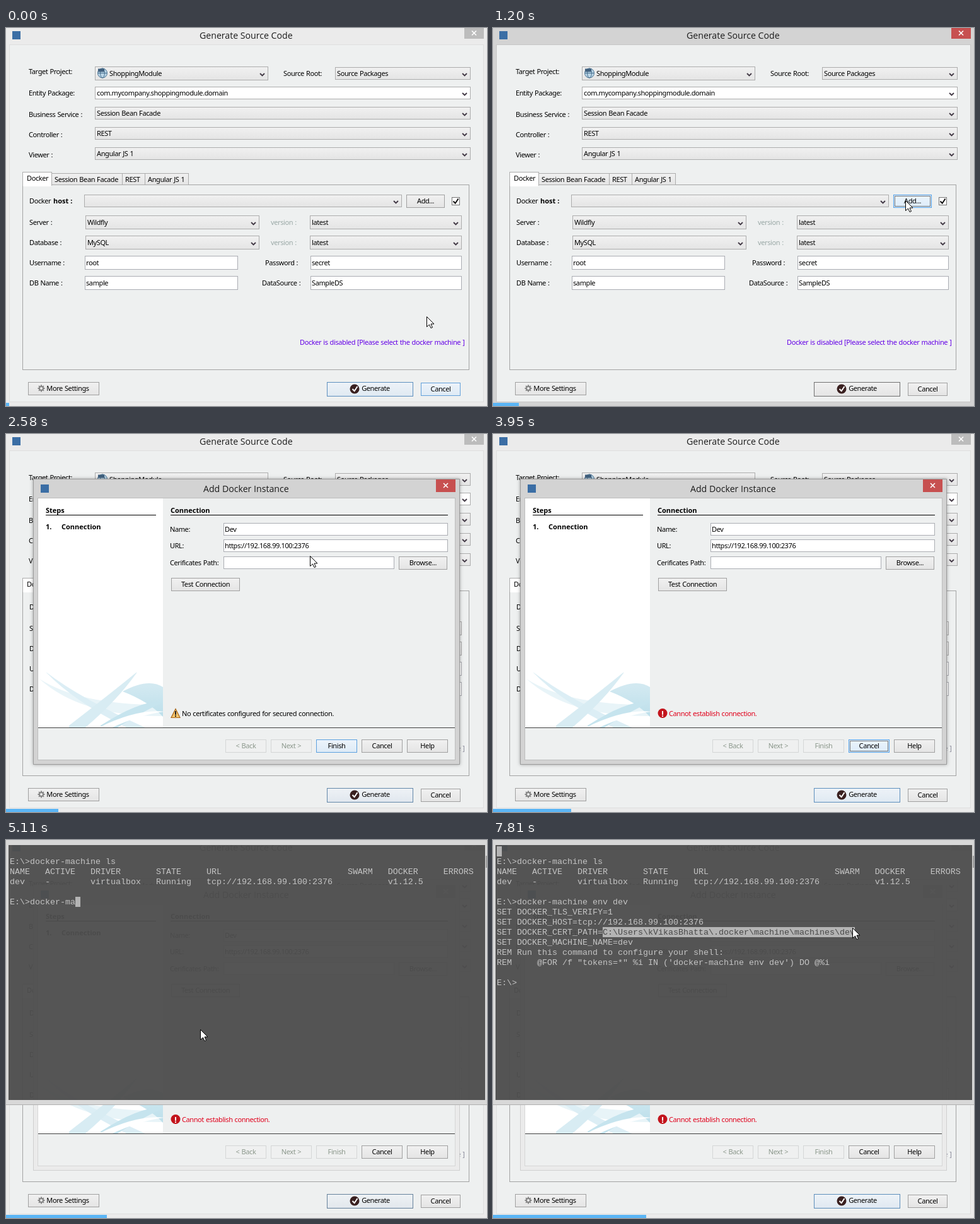
Write an HTML page with a canvas that moves like this. It is 763 px wide and 599 px high and loops after 8 s.

```html
<!DOCTYPE html>
<html lang="en">
<head>
<meta charset="utf-8">
<title>Generate Source Code</title>
<style>
html, body { margin: 0; width: 100%; height: 100%; overflow: hidden; background: #ebebeb; }
canvas { display: block; }
</style>
</head>
<body>
<canvas id="stage" width="763" height="599"></canvas>
<script>
const c = document.getElementById('stage').getContext('2d', { alpha: false });
const LOOP = 8000, STEPS = 47, STEP = LOOP / STEPS;
const UI = '11px "Noto Sans", sans-serif';
const BOLD = 'bold 11px "Noto Sans", sans-serif';
const TITLE = '14.15px "Open Sans", sans-serif';
const MONO = '13.333px "Liberation Mono", monospace';
const FACE = '#eef0f0', ACTIVE = '#d3d3d3', INACTIVE = '#ebebeb', EDGE = '#acacac', LOGO = '#3b6ea5';

// Scene events in ms
const FOCUS = 150, PRESS = 1000, MODAL = 1500, FAIL = 3050, CONSOLE = 4050;
const LISTED = 4400, TYPE = 4640, TYPED = 5787, ENTER = 5940, SELECT = 6700;

const clamp = (v, lo, hi) => Math.max(lo, Math.min(hi, v));
const ease = k => k * k * (3 - 2 * k);

// Mouse moves: begin, end, x, y
const MOVES = [[FOCUS, PRESS, 654, 273], [1700, 2240, 672, 144], [2240, 2540, 482, 193],
  [2560, 2950, 310, 234], [3950, 4000, 308, 300], [6320, SELECT, 174, 139], [SELECT, 7650, 570, 139]];

function mouseAt(t) {
  return MOVES.reduce(([px, py], [begin, end, x, y]) => {
    const k = ease(clamp((t - begin) / (end - begin), 0, 1));
    return [px + (x - px) * k, py + (y - py) * k];
  }, [667, 457]).map(Math.round);
}

function fill(x0, y0, x1, y1, color) {
  c.fillStyle = color;
  c.fillRect(x0, y0, x1 - x0, y1 - y0);
}

function box(x0, y0, x1, y1, color, edge) {
  if (color) fill(x0, y0, x1, y1, color);
  c.strokeStyle = edge;
  c.lineWidth = 1;
  c.strokeRect(x0 + .5, y0 + .5, x1 - x0 - 1, y1 - y0 - 1);
}

function poly(points, color, edge, width = 1) {
  c.beginPath();
  points.forEach(([x, y]) => c.lineTo(x, y));
  if (color) { c.closePath(); c.fillStyle = color; c.fill(); }
  if (edge) { c.strokeStyle = edge; c.lineWidth = width; c.stroke(); }
}

const line = (x0, y0, x1, y1, color, width) => poly([[x0, y0], [x1, y1]], null, color, width);

function oval(x, y, rx, ry, color, edge) {
  c.beginPath();
  c.ellipse(x, y, rx, ry, 0, 0, 7);
  if (color) { c.fillStyle = color; c.fill(); }
  if (edge) { c.strokeStyle = edge; c.lineWidth = 1; c.stroke(); }
}

const disc = (x, y, r, color) => oval(x, y, r, r, color);

function tick(x, y, r, color) {
  poly([[x - r, y], [x - r * .2, y + r * .8], [x + r, y - r]], null, color, 2);
}

// y is the vertical middle of the line
function text(s, x, y, color = '#000', font = UI, align = 'left') {
  c.font = font;
  c.letterSpacing = font === UI ? '-0.4px' : '0px';
  c.wordSpacing = font === UI ? '0.6px' : '0px';
  c.textAlign = align;
  c.fillStyle = color;
  c.fillText(s, x, y + (font === TITLE ? 5 : 4));
}

function shade(y0, y1, from = '#f1f1f1', to = '#e4e4e4') {
  const g = c.createLinearGradient(0, y0, 0, y1);
  g.addColorStop(0, from);
  g.addColorStop(1, to);
  return g;
}

const mix = (a, b, k) => `rgb(${a.map((v, i) => Math.round(v + (b[i] - v) * k))})`;

function button(label, x, y, w, { h = 21, glow = 0, off = false, focus = false, rim = 160, dx = 0 } = {}) {
  const top = mix([241, 241, 241], [236, 244, 252], glow);
  const low = mix([228, 228, 228], [220, 235, 249], glow);
  const edge = off ? '#d4d6d6' : mix([rim, rim, rim], [82, 160, 232], glow);
  box(x, y, x + w, y + h, off ? '#eff0f0' : shade(y, y + h, top, low), edge);
  if (focus) {
    c.setLineDash([1, 1]);
    box(x + 2, y + 2, x + w - 2, y + h - 2, null, '#000');
    c.setLineDash([]);
  }
  text(label, x + w / 2 + dx, y + 10, off ? '#8c988c' : '#000', UI, 'center');
}

function field(s, x, y, w, h = 20) {
  box(x, y, x + w, y + h, '#fff', '#abadb3');
  text(s, x + 2, y + h / 2);
}

function combo(s, x, y, w, { h = 20, pad = 3, color = shade(y, y + h) } = {}) {
  box(x, y, x + w, y + h, color, EDGE);
  const cx = x + w - 9.5, cy = y + h / 2;
  text(s, x + pad, cy);
  poly([[cx - 3.5, cy], [cx, cy + 3.5], [cx + 3.5, cy]], null, '#433a46', 1.9);
}

function closeBox(x, y, w, h, color) {
  fill(x, y, x + w, y + h, color);
  const cx = x + w / 2, cy = y + h / 2 - .5;
  for (const d of [-3.5, 3.5]) line(cx - d, cy - 3.5, cx + d, cy + 3.5, '#fff', 1.6);
}

function globe(x, y) {
  oval(x, y, 7.5, 7.5, '#b9d4e6', '#47708f');
  oval(x, y, 3.4, 7.5, null, '#47708f');
  line(x - 7, y, x + 7, y, '#47708f');
  fill(x - 7, y - 7, x + 3, y - 2, '#40607e');
}

function gear(x, y) {
  for (let a = 0; a < Math.PI; a += Math.PI / 4) {
    const dx = 5.5 * Math.cos(a), dy = 5.5 * Math.sin(a);
    line(x - dx, y - dy, x + dx, y + dy, '#858585', 2);
  }
  disc(x, y, 4, '#858585');
  disc(x, y, 2, '#ececec');
}

function mainWindow(t, modal, pulse) {
  const active = t >= FOCUS && !modal, onAdd = t >= PRESS && !modal;
  fill(0, 0, 763, 599, active ? ACTIVE : INACTIVE);
  box(5, 26, 758, 593, FACE, active ? '#c6c6c6' : '#dedede');
  fill(10, 5, 23, 18, LOGO);
  text('Generate Source Code', 307, 12, '#1c1c1c', TITLE);
  closeBox(727, 0, 31, 17, active ? '#c75050' : '#bcbcbc');

  text('Target Project:', 36, 69);
  combo('ShoppingModule', 141, 61, 275, { h: 22, pad: 23 });
  globe(153, 71.5);
  text('Source Root:', 440, 72);
  combo('Source Packages', 522, 62, 215);
  text('Entity Package:', 36, 103);
  combo('com.mycompany.shoppingmodule.domain', 141, 93, 596, { color: '#fff' });
  [['Business Service :', 'Session Bean Facade'], ['Controller :', 'REST'],
    ['Viewer :', 'Angular JS 1']].forEach(([label, value], i) => {
    const y = 125 + 32 * i;
    text(label, 36, y + 12);
    combo(value, 141, y, 596);
  });

  box(26, 248, 735, 542, FACE, '#a3a3a3');
  let x = 72;
  for (const [label, w] of [['Session Bean Facade', 112], ['REST', 36], ['Angular JS 1', 69]]) {
    box(x, 230, x + w + 1, 249, shade(230, 249), EDGE);
    text(label, x + 5, 240);
    x += w;
  }
  box(26, 228, 73, 250, '#fff', EDGE);
  fill(27, 248, 72, 251, '#fff');
  text('Docker', 33, 238);

  text('Docker', 37, 274);
  text('host :', 75, 274, '#000', BOLD);
  combo('', 124, 264, 504);
  button('Add...', 635, 264, 61, { glow: onAdd ? 1 : 0, focus: onAdd });
  box(707, 268, 720, 281, '#fff', '#777');
  tick(713.5, 274.5, 4, '#111');

  [['Server :', 'Wildfly'], ['Database :', 'MySQL']].forEach(([label, value], i) => {
    const y = 308 + 32 * i;
    text(label, 37, y);
    combo(value, 126, y - 11, 276, { h: 22 });
    text('version :', 420, y, '#9aa8a6');
    combo('latest', 482, y - 11, 241, { h: 22 });
  });
  [['Username :', 'root', 'Password :', 'secret'],
    ['DB Name :', 'sample', 'DataSource :', 'SampleDS']].forEach(([a, left, b, right], i) => {
    const y = 372 + 32 * i;
    text(a, 37, y);
    field(left, 125, y - 11, 243, 22);
    text(b, 411 - 5 * i, y);
    field(right, 483, y - 11, 240, 22);
  });
  const note = modal ? '#8a8a9a' : '#6400e6';
  text('Docker is disabled [Please select the docker machine ]', 466, 498, note);

  button('More Settings', 35, 561, 113, { dx: 6.5 });
  gear(56, 571);
  button('Generate', 509, 561, 137, { h: 23, rim: 112, glow: onAdd ? 0 : pulse, dx: 9 });
  disc(553, 572, 7.5, '#3a2020');
  tick(553.5, 572, 4, '#fff');
  button('Cancel', 658, 562, 63, { glow: t < PRESS ? .8 : 0 });
}

// A band that widens from a point to width w
function ribbon(color, x0, y0, cx, cy, x1, y1, w) {
  c.beginPath();
  c.moveTo(x0, y0);
  c.quadraticCurveTo(cx, cy - w / 2, x1, y1 - w / 2);
  c.lineTo(x1, y1 + w / 2);
  c.quadraticCurveTo(cx, cy + w / 2, x0, y0);
  c.fillStyle = color;
  c.fill();
}

function swoosh() {
  c.save();
  c.beginPath();
  c.rect(53, 378, 196, 87);
  c.clip();
  ribbon('#e8f4f8', 53, 388, 120, 440, 255, 438, 18);
  ribbon('#dceef5', 62, 376, 115, 425, 225, 474, 14);
  ribbon('#d8ecf3', 209, 376, 170, 420, 100, 474, 24);
  ribbon(shade(400, 465, '#d2e9f1', '#b4dbe8'), 185, 408, 240, 404, 262, 440, 50);
  ribbon('#c6e4ee', 252, 424, 215, 430, 150, 472, 20);
  ribbon('#fff', 252, 440, 205, 440, 140, 474, 10);
  c.restore();
}

function dialog(t, pulse) {
  const active = t < CONSOLE, failed = t >= FAIL, onCancel = failed && active;
  c.save();
  c.shadowColor = active ? 'rgba(0,0,0,.35)' : 'transparent';
  c.shadowBlur = 5;
  fill(43, 71, 720, 524, active ? ACTIVE : INACTIVE);
  c.restore();
  box(43, 71, 720, 524, null, active ? '#9c9c9c' : '#cfcfcf');
  box(50, 101, 713, 517, FACE, active ? '#bdbdbd' : '#d6d6d6');
  fill(55, 80, 68, 93, LOGO);
  text('Add Docker Instance', 313, 87, '#1c1c1c', TITLE);
  closeBox(682, 72, 31, 20, active ? '#c75050' : '#bcbcbc');

  fill(51, 102, 249, 465, '#fff');
  swoosh();
  fill(51, 465, 712, 466, '#404040');
  text('Steps', 63, 121, '#000', BOLD);
  fill(63, 128, 238, 129, '#000');
  text('1.', 63, 147, '#000', BOLD);
  text('Connection', 88, 147, '#000', BOLD);
  text('Connection', 261, 121, '#000', BOLD);
  fill(261, 128, 701, 129, '#000');

  const typed = clamp(Math.floor((t - MODAL) / STEP), 0, 3);
  text('Name:', 260, 151);
  field('Dev'.slice(0, typed), 345, 141, 356);
  if (t < 2400) fill(348 + typed * 6, 144, 349 + typed * 6, 158, '#000');
  text('URL:', 260, 177);
  field('https://192.168.99.100:2376', 345, 167, 356);
  text('Cerificates Path:', 260, 204);
  field('', 345, 194, 271);
  button('Browse...', 623, 194, 77);
  button('Test Connection', 262, 228, 109, { glow: t >= 2900 && t < 3450 ? .8 : 0 });

  if (failed) disc(269, 442.5, 7.5, '#c3141c');
  else poly([[269, 435.5], [276, 449.5], [262, 449.5]], '#f6c56b', '#a8651c', 1.2);
  const mark = failed ? '#fff' : '#222';
  fill(268, 439, 270, 445, mark);
  fill(268, 446, 270, 448, mark);
  if (failed) text('Cannot establish connection.', 279, 443, '#e0001b');
  else text('No certificates configured for secured connection.', 279, 443);

  const states = {
    '< Back': { off: true },
    'Next >': { off: true },
    Finish: { off: failed, glow: .4 + pulse },
    Cancel: { glow: onCancel ? 1 : 0, focus: onCancel },
    Help: {}
  };
  Object.entries(states).forEach(([label, state], i) => button(label, 348 + 72 * i, 484, 65, state));
}

const CERT = 'C:\\Users\\kVikasBhatta\\.docker\\machine\\machines\\dev';
const ENV = 'docker-machine env dev';
const LIST = [
  'NAME   ACTIVE   DRIVER       STATE     URL                         SWARM   DOCKER     ERRORS',
  'dev    -        virtualbox   Running   tcp://192.168.99.100:2376           v1.12.5', ''];
const VARS = [
  'SET DOCKER_TLS_VERIFY=1',
  'SET DOCKER_HOST=tcp://192.168.99.100:2376',
  'SET DOCKER_CERT_PATH=' + CERT,
  'SET DOCKER_MACHINE_NAME=dev',
  'REM Run this command to configure your shell:',
  'REM     @FOR /f "tokens=*" %i IN (\'docker-machine env dev\') DO @%i', '', 'E:\\>'];

function terminal(t, mouseX) {
  fill(4, 8, 760, 412, 'rgba(79,79,79,.96)');
  c.beginPath();
  c.rect(0, 0, 763, 419);
  c.rect(4, 8, 756, 404);
  c.fillStyle = '#d8d8d8';
  c.fill('evenodd');
  fill(0, 419, 763, 420, '#b0b0b0');
  fill(761, 25, 763, 44, '#a0a0a0');

  const lines = ['', 'E:\\>docker-machine ls'];
  if (t >= LISTED) {
    const k = clamp((t - TYPE) / (TYPED - TYPE), 0, 1);
    lines.push(...LIST, 'E:\\>' + ENV.slice(0, Math.round(k * ENV.length)));
  }
  if (t >= ENTER) lines.push(...VARS);
  lines.forEach((s, row) => text(s, 6, 18 + 16 * row, '#c4c4c4', MONO));

  const selecting = t >= SELECT;
  const row = selecting ? 0 : lines.length - 1;
  const x = 6 + 8 * lines[row].length, y = 10 + 16 * row;
  fill(x, y, x + 8, y + 16, '#b4b4b4');
  if (selecting) {
    const n = clamp(Math.floor((mouseX - 174) / 8) + 1, 1, CERT.length);
    fill(174, 138, 174 + 8 * n, 154, '#b4b4b4');
    text(CERT.slice(0, n), 174, 146, '#484848', MONO);
  }
}

function pointer(x, y) {
  const shape = [[0, 0], [0, 16], [4, 12.5], [6.5, 18], [9, 17], [6.5, 11.5], [11.5, 11.5], [0, 0]];
  poly(shape.map(([px, py]) => [x + px + .5, y + py + .5]), '#fff', '#000');
}

function draw(clock) {
  const step = Math.min(STEPS - 1, Math.floor((clock % LOOP + 25) / STEP));
  const t = step * STEP;
  const pulse = .5 + .15 * Math.cos(t / 2000 * 2 * Math.PI);
  const modal = t >= MODAL, shell = t >= CONSOLE;
  const [x, y] = mouseAt(t);
  mainWindow(t, modal, pulse);
  if (modal) dialog(t, pulse);
  if (shell) terminal(t, x);
  fill(0, 594, Math.round(5.16 * (step + 1)), 599, '#5ab5f5');
  if (t < 3550 || shell) pointer(x, y);
}

let origin;
function loop(now) {
  origin ??= now;
  draw(Math.max(0, now - origin));
  requestAnimationFrame(loop);
}
draw(0);
requestAnimationFrame(loop);
</script>
</body>
</html>
```
